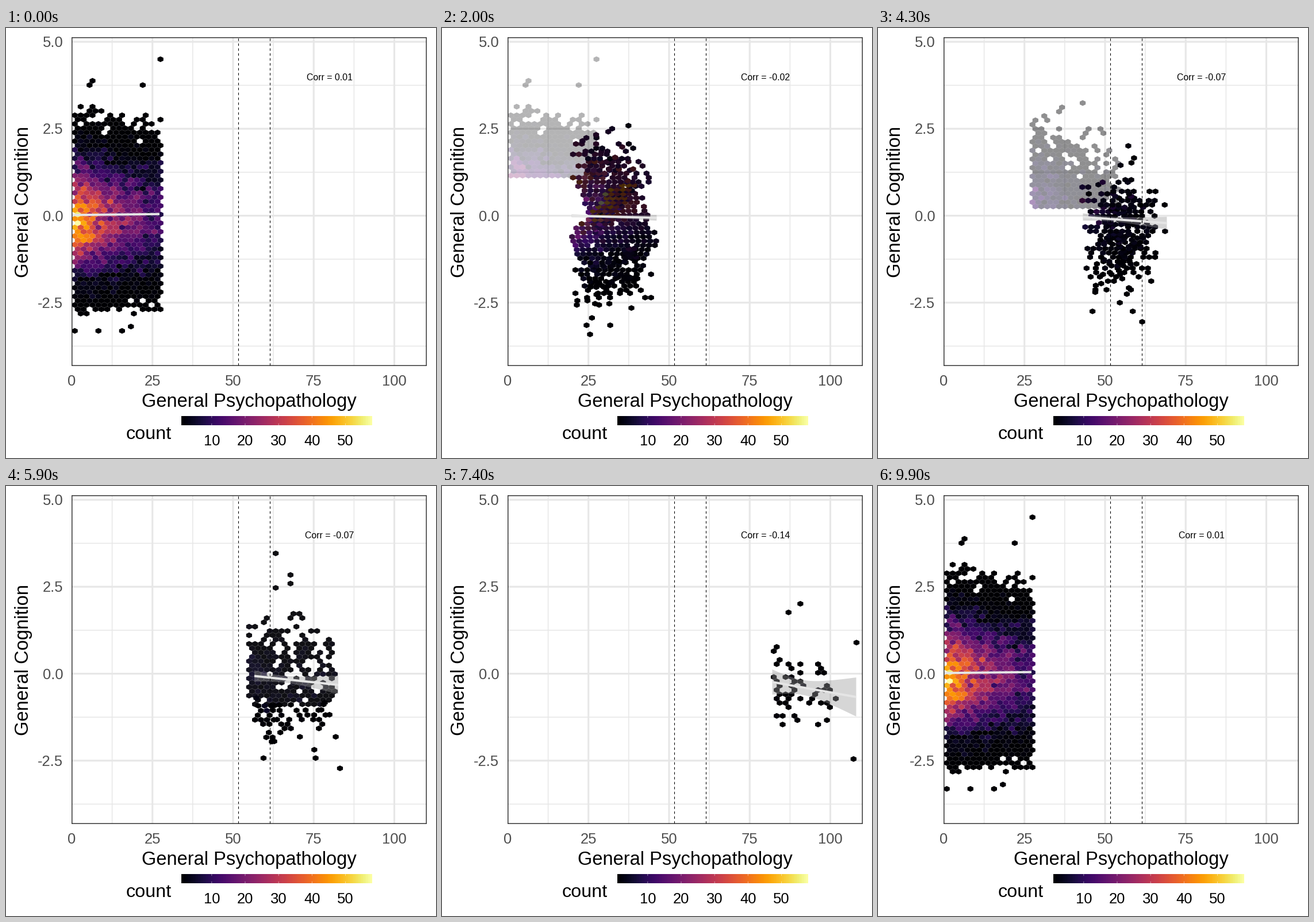
These frames come from a looping animation (748 px wide and 748 px high, 10000 ms). A matplotlib script:

```python
import numpy as np
import matplotlib.pyplot as plt
from matplotlib.animation import FuncAnimation
from matplotlib.collections import PolyCollection
from matplotlib.patches import Rectangle

SIZE, DPI = 748, 100
PT = 72 / DPI                      # points per pixel
LEFT, TOP, RIGHT, BOTTOM = 114.5, 16.5, 731.5, 587.5
DX, PITCH, BIN_H = 5.14, 7.5, 8.66
ZERO_Y = 326.5
MAX_COUNT = 58

plt.rcParams["font.family"] = "Liberation Sans"
inferno = plt.get_cmap("inferno")
rng = np.random.default_rng(5)


def px(value):
    """Data x to pixel x."""
    return LEFT + 5.61 * value


def py(value):
    """Data y to pixel y."""
    return ZERO_Y - 60.5 * value


class State:
    """One bin of the x axis: a hexagon cloud, its fit line and label."""

    def __init__(self, label, origin, total, cols, rows, cloud, outliers, line, band):
        self.label = label
        base = ZERO_Y + BIN_H * origin
        row, col, count = self.scatter(base, total, cols, rows, cloud, outliers)
        self.pos = np.column_stack([LEFT + DX * col, base - PITCH * row])
        self.color = inferno((count - 1) / (MAX_COUNT - 1))

        x0, y0, x1, y1 = line
        waist, slope, mid = band
        u = np.linspace(0, 1, 41)
        half = np.hypot(waist, slope * (u - mid))
        y = y0 + (y1 - y0) * u
        self.fit = np.array([x0 + (x1 - x0) * u, y, y - half, y + half])

    @staticmethod
    def scatter(base, total, cols, rows, cloud, outliers):
        """Keep the likeliest lattice cells, with noise, and draw their counts."""
        peak, reach, center, above, below, noise = cloud
        row, col = np.mgrid[rows[0]:rows[1] + 1, cols[0]:cols[1] + 1]
        even = (row + col) % 2 == 0
        row, col = row[even], col[even]
        dy = base - PITCH * row - center
        spread = np.where(dy < 0, above, below)
        mean = peak * np.exp(-(col - cols[0]) / reach - 0.5 * (dy / spread) ** 2)
        rank = mean * rng.lognormal(0, noise, mean.size)
        count = np.clip(rng.poisson(mean), 1, MAX_COUNT)
        keep = np.argsort(-rank)[:total]
        cells = np.column_stack([row, col, count])[keep]
        cells = np.vstack([cells, [(r, c, 1) for r, c in outliers]])
        return cells[np.lexsort((cells[:, 1], cells[:, 0]))].T


# cloud: peak count, reach in columns, center y, spread above, spread below, noise
states = [
    State("Corr = 0.01", 24, 662, (1, 30), (3, 53), (50, 21, 335, 58, 51, 0.8),
          [(1, 1), (1, 9), (1, 17), (2, 20), (58, 6), (58, 24), (59, 7), (64, 30)],
          (114.5, 325.3, 267, 323.7), (1, 2, 0.4)),
    State("Corr = -0.02", 25, 455, (30, 59), (6, 52), (10, 15, 330, 66, 60, 1.0),
          [(1, 39), (4, 34), (4, 42), (53, 39), (54, 40), (55, 47)],
          (271.6, 327.3, 417.6, 332.8), (2.5, 7.6, 0.22)),
    State("Corr = -0.07", 20, 240, (60, 89), (5, 38), (4, 22, 338, 52, 50, 1.0),
          [(1, 89), (3, 63), (3, 81), (43, 69), (44, 74), (46, 74), (51, 69)],
          (422.5, 329.8, 568.5, 344.6), (5.5, 20.8, 0.34)),
    State("Corr = -0.14", 18, 50, (90, 111), (7, 30), (1, 16, 355, 48, 42, 1.1),
          [(1, 117), (28, 118), (35, 95), (37, 99)],
          (574.5, 341, 720.5, 367), (13, 49, 0.36)),
]
MOVES = [(8, 25), (34, 50), (58, 74), (83, 99)]   # first and last frame of each move

fig = plt.figure(figsize=(SIZE / DPI, SIZE / DPI), dpi=DPI, facecolor="white")
ax = fig.add_axes([0, 0, 1, 1])
ax.axis("off")
ax.imshow(np.linspace(0, 1, 300)[None, :], cmap=inferno, aspect="auto",
          extent=(305, 637, 691, 675), interpolation="bilinear")
ax.set(xlim=(0, SIZE), ylim=(SIZE, 0))


def rule(xs, ys, width, color, z, **style):
    return ax.plot(xs, ys, color=color, lw=width * PT, zorder=z, snap=False,
                   solid_capstyle="butt", dash_capstyle="butt", **style)[0]


def write(x, y, text, size, color="black", ha="center", **style):
    return ax.text(x, y, text, fontsize=size * PT, color=color, ha=ha,
                   va="baseline", **style)


def grid_width(k):
    return 1.55 if k % 2 else 3.1


for k in range(1, 9):
    rule([px(12.5 * k)] * 2, [TOP, BOTTOM], grid_width(k), "#e7e7e7", 1)
for k in range(-3, 5):
    rule([LEFT, RIGHT], [py(1.25 * k)] * 2, grid_width(k), "#e7e7e7", 1)
for x in (404.5, 459.5):
    rule([x, x], [BOTTOM, TOP], 1.07, "black", 6, linestyle=(0, (4, 4)))
ax.add_patch(Rectangle((LEFT + 0.3, TOP + 0.3), RIGHT - LEFT - 0.6, BOTTOM - TOP - 0.6,
                       fill=False, ec="#333333", lw=1.5 * PT, zorder=7, snap=False))

GREY = "#4d4d4d"
for value in range(0, 101, 25):
    write(px(value), 621.5, str(value), 25.6, GREY)
for value in (-2.5, 0, 2.5, 5):
    write(99.5, py(value) + 9, f"{value:.1f}", 25.6, GREY, "right")
write(423, 659, "General Psychopathology", 32.6)
write(39, 302.5, "General Cognition", 32.6, rotation=90, rotation_mode="anchor")
write(248.5, 715, "count", 32.4)
for value in range(10, 51, 10):
    x = 305.5 + 331.5 * (value - 1) / (MAX_COUNT - 1)
    write(x, 726.5, str(value), 25.6)
    for y in (675, 687.8):
        rule([x, x], [y, y + 3.2], 0.8, "white", 4, alpha=0.6)
label = write(563, 91, "", 15.9, zorder=8)

HEXAGON = np.array([[1, 1], [1, -1], [0, -2], [-1, -1], [-1, 1], [0, 2]]) * [DX, 2.49]
clip = Rectangle((LEFT, TOP), RIGHT - LEFT, BOTTOM - TOP, transform=ax.transData)
hexes = PolyCollection([], edgecolors="none", linewidths=0, zorder=3)
ribbon = PolyCollection([], facecolors=[(0.6, 0.6, 0.6, 0.4)], edgecolors="none",
                        linewidths=0, zorder=4)
for artist in (hexes, ribbon):
    ax.add_collection(artist, autolim=False)
    artist.set_clip_path(clip)
fit_line = rule([], [], 4, "#e5e5e5", 5)
fit_line.set_clip_path(clip)


def faded(colors, alpha):
    out = colors.copy()
    out[:, 3] = alpha
    return out


def update(frame):
    k = max(sum(frame >= start for start, _ in MOVES) - 1, 0)
    start, end = MOVES[k]
    t = min(max((frame - start) / (end - start), 0), 1)
    a, b = states[k], states[(k + 1) % len(states)]

    # Cells pair up by row order; the surplus fades out or in where it stands.
    n = min(len(a.pos), len(b.pos))
    moving = (1 - t) * a.pos[:n] + t * b.pos[:n]
    mixed = (1 - t) * a.color[:n] + t * b.color[:n]
    pos = np.vstack([a.pos[n:], b.pos[n:], moving])
    color = np.vstack([faded(a.color[n:], 1 - t), faded(b.color[n:], t), mixed])
    hexes.set_verts(pos[:, None, :] + HEXAGON)
    hexes.set_facecolor(color)

    x, y, upper, lower = (1 - t) * a.fit + t * b.fit
    fit_line.set_data(x, y)
    ribbon.set_verts([np.column_stack([np.r_[x, x[::-1]], np.r_[upper, lower[::-1]]])])
    label.set_text(a.label if t < 0.5 else b.label)
    return hexes, ribbon, fit_line, label


anim = FuncAnimation(fig, update, frames=100, interval=100, repeat=True)
plt.show()
```
